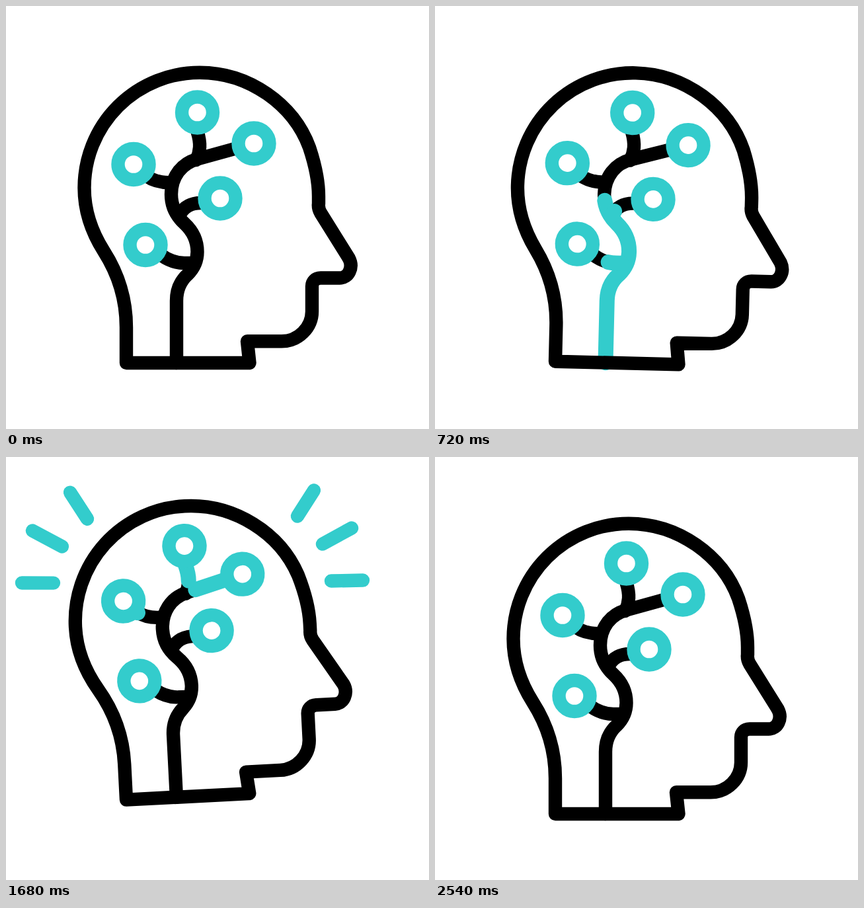
Recreate the animation shown at these times as an HTML page. Size 640 by 640 pixels, loop 3 s.

```html
<!DOCTYPE html>
<html lang="en">
<head>
<meta charset="utf-8">
<title>Mind</title>
<style>
html, body { margin: 0; width: 100%; height: 100%; overflow: hidden; background: #fff; }
svg { display: block; width: 100vw; height: 100vh; }
path, circle { fill: none; stroke-width: 20.4; stroke-linecap: round; stroke-linejoin: round; }
.dark { stroke: #000; }
.teal { stroke: #33cccc; }
.flow { stroke-width: 23; }
circle { fill: #fff; }
</style>
</head>
<body>
<svg viewBox="0 0 640 640"><g id="stage"></g></svg>
<script>
const LOOP = 3000;
const PIVOT = [182, 540];
const stage = document.getElementById('stage');

const HEAD = 'M182 540V486C182 445 171 407 148 371C129 341 118.5 308 118.5 275' +
  'A174.5 174.3 0 0 1 293 100.7C368 100.7 435 149 459 214C467 238 473 264 473 288' +
  'V299Q472 306 476 313L519 382C526 396 518 411.5 505 411.5H476C468 411.5 463 417 463 424' +
  'V462C463 487 442 507.3 417 507.3H365L368.5 540Z';

// Each line is drawn in over "on" and wiped from its root over "off".
const lines = [
  { d: 'M258 540V446C258 430 264 416 275 406C284 397 289.5 385 289.5 372C289.5 355 283 341 270 329' +
       'C257 317 250 302 250 285C250 259 265 239 288 232L375 208',
    on: [440, 930], off: [1340, 1803], eased: true },
  { d: 'M279 389H270C257 389 246 385 235 377L211 361.5', on: [680, 830], off: [1420, 1660] },
  { d: 'M262 317C269 304 279 298 295 298L324 291', on: [700, 900], off: [1450, 1680] },
  { d: 'M252 267C236 268 222 264 212 257L193 239.5', on: [745, 960], off: [1570, 1760] },
  { d: 'M288 233C294 220 295 208 289.5 190V161', on: [785, 1010], off: [1640, 1790] }
].map(line => ({ ...line, style: 'teal flow' }));

const rays = [
  'M88.9 206.8L41 204.3', 'M104.7 152.5L61 126.2', 'M144.8 112.6L120.9 71.3',
  'M462.6 124.8L489.5 87.1', 'M498.4 168.7L543.6 146.9', 'M508.5 225.2L556.5 226.7'
].map(d => ({ d, on: [840, 1120], off: [1700, 1900], eased: true, style: 'teal' }));

const nodes = [
  { x: 211, y: 361.5, start: 785 }, { x: 324, y: 291, start: 863 },
  { x: 193, y: 239.5, start: 948 }, { x: 375, y: 208, start: 957 },
  { x: 289.5, y: 161, start: 986 }
];

// [time, value, linear?]
const lift = [[200, 0], [340, 24.5], [938, -13.6], [1680, -21.4, true], [1940, 24.5], [2240, -13], [2540, 0]];
const tilt = [[300, 0], [540, 3.6], [910, -0.95], [1700, -2.98, true], [1780, -2.98], [2080, 3.6], [2380, 0]];

const clamp = u => Math.min(1, Math.max(0, u));
const smooth = u => u * u * (3 - 2 * u);
const progress = (t, [a, b]) => clamp((t - a) / (b - a));

function track(keys, t) {
  const i = keys.findIndex(k => k[0] > t);
  if (i === 0) return keys[0][1];
  if (i < 0) return keys[keys.length - 1][1];
  const [a, from] = keys[i - 1], [b, to, linear] = keys[i];
  const u = progress(t, [a, b]);
  return from + (to - from) * (linear ? u : smooth(u));
}

function add(tag, attrs) {
  const el = document.createElementNS('http://www.w3.org/2000/svg', tag);
  for (const name in attrs) el.setAttribute(name, attrs[name]);
  return stage.appendChild(el);
}

for (const { d } of lines) add('path', { d, class: 'dark' });
const strokes = [...lines, ...rays];
for (const s of strokes) s.el = add('path', { d: s.d, class: s.style, pathLength: 1 });
for (const n of nodes) n.el = add('circle', { cx: n.x, cy: n.y, class: 'teal' });
add('path', { d: HEAD, class: 'dark' });

function trim({ el, on, off, eased }, t) {
  const ease = eased ? smooth : u => u;
  const end = ease(progress(t, on)), start = ease(progress(t, off));
  const length = end - start;
  el.style.visibility = length > 0.001 ? 'visible' : 'hidden';
  el.setAttribute('stroke-dasharray', `${length} 3`);
  el.setAttribute('stroke-dashoffset', -start);
}

function render(t) {
  stage.setAttribute('transform', `translate(0 ${track(lift, t)}) rotate(${track(tilt, t)} ${PIVOT})`);
  for (const s of strokes) trim(s, t);
  for (const { el, start } of nodes) {
    const pulse = Math.sin(Math.PI * progress(t, [start, start + 300])) ** 2;
    el.setAttribute('r', 23.5 + 5.2 * pulse);
  }
}

const begin = performance.now();
function tick() {
  render((performance.now() - begin) % LOOP);
  requestAnimationFrame(tick);
}
tick();
</script>
</body>
</html>
```
